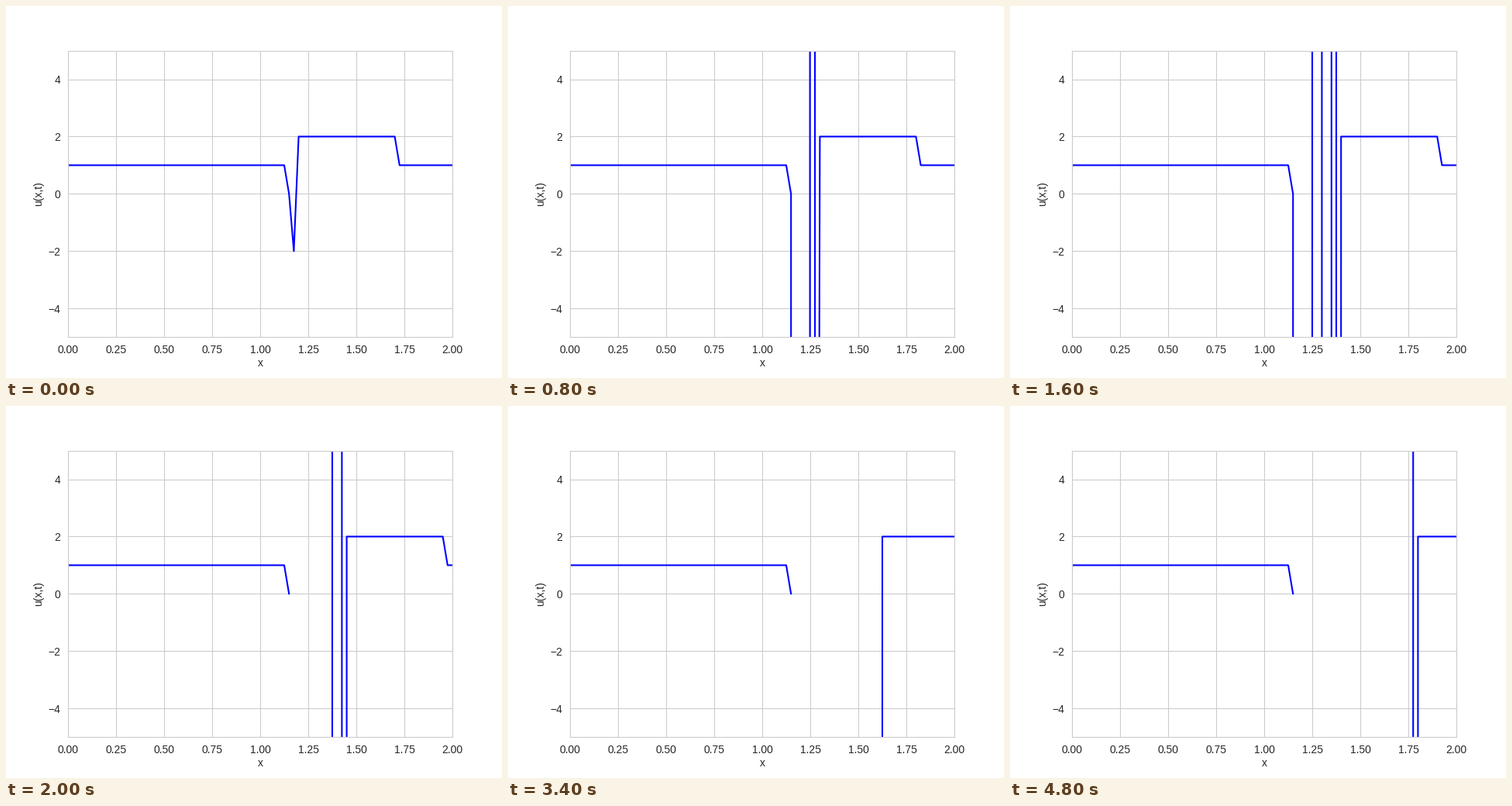
Write a matplotlib script that moves like this. It is 640 px wide and 480 px high and loops after 5000 ms.

```python
import matplotlib.pyplot as plt
import numpy as np
from matplotlib.animation import FuncAnimation

FRAMES, INTERVAL = 25, 200
WARMUP_STEPS = 2
NX = 81

plt.rcParams.update({
    "font.family": "Liberation Sans",
    "font.size": 10,
    "text.color": ".15",
    "axes.labelcolor": ".15",
    "axes.edgecolor": ".8",
    "axes.axisbelow": True,
    "axes.grid": True,
    "grid.color": ".8",
    "grid.linewidth": 0.8,
    "xtick.color": ".15",
    "ytick.color": ".15",
    "lines.solid_capstyle": "round",
})

x = np.linspace(0, 2, NX)


def upwind_step(u):
    """Nonlinear convection with dt = dx, which blows up where u > 1."""
    new = u.copy()
    new[1:] -= u[1:] * (u[1:] - u[:-1])
    return new


def solve(steps):
    u = np.ones(NX)
    u[46:67] = 2
    states = [u]
    with np.errstate(all="ignore"):
        for _ in range(steps):
            states.append(upwind_step(states[-1]))
    return states


states = solve(WARMUP_STEPS + FRAMES - 1)[WARMUP_STEPS:]

fig, ax = plt.subplots(figsize=(6.4, 4.8), dpi=100)
ax.set_xlim(0, 2)
ax.set_ylim(-5, 5)
ax.set_xlabel("x", labelpad=2)
ax.set_ylabel("u(x,t)")
ax.tick_params(length=0, pad=7)
line, = ax.plot([], [], color="blue", linewidth=1.5)


def update(frame):
    line.set_data(x, states[frame])
    return line,


anim = FuncAnimation(fig, update, frames=FRAMES, interval=INTERVAL, repeat=True)
plt.show()
```
